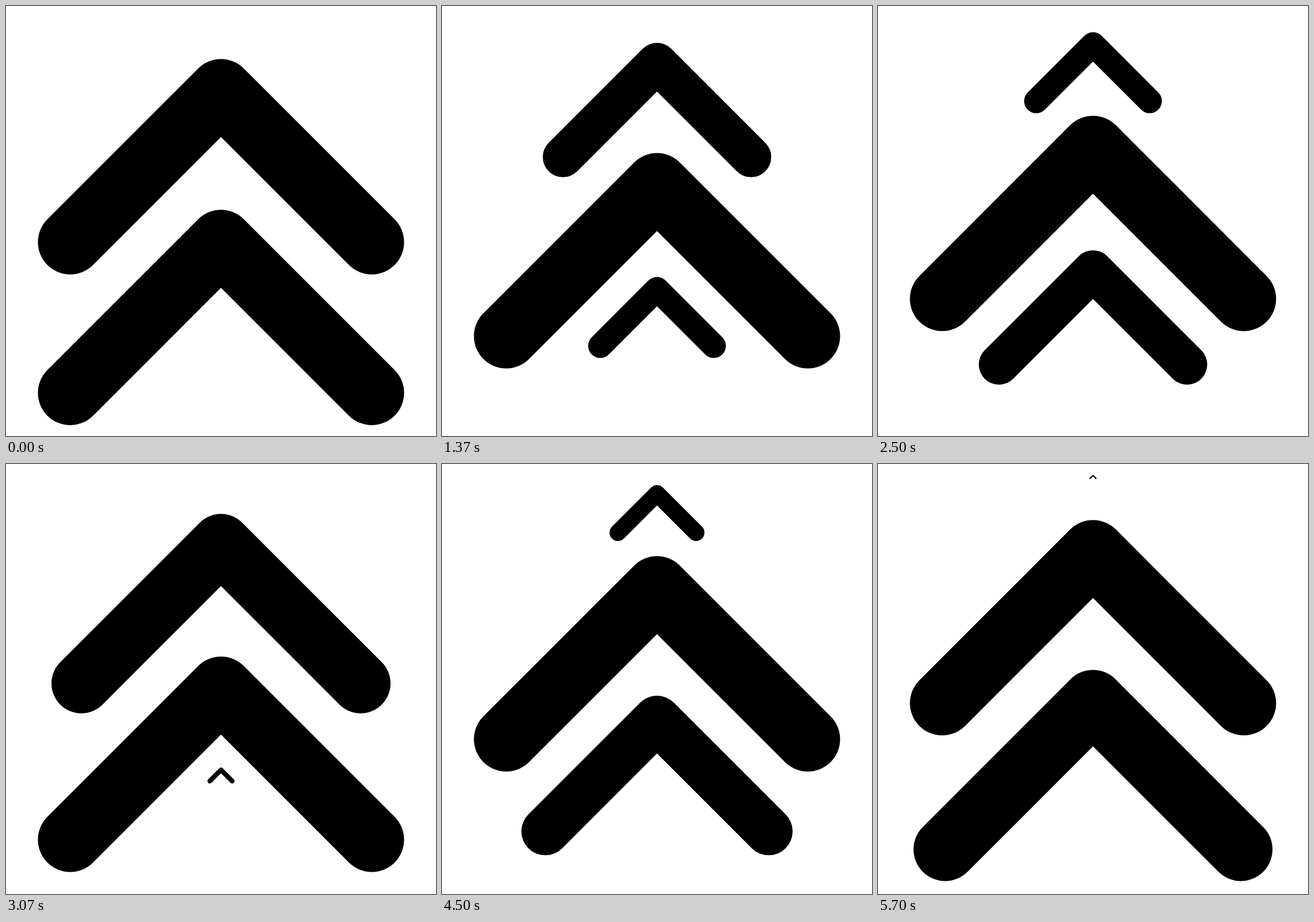
These frames come from a looping animation (748x748 px, 5730 ms). An HTML page:

```html
<!DOCTYPE html>
<html lang="en">
<head>
<meta charset="utf-8">
<title>Rising chevrons</title>
<style>
  html, body { margin: 0; width: 100%; height: 100%; overflow: hidden; background: #fff; }
  svg { display: block; width: 100%; height: 100%; }
  polyline { fill: none; stroke: #000; stroke-width: 112.4; stroke-linecap: round; stroke-linejoin: round; }
</style>
</head>
<body>
<svg viewBox="0 0 748 748">
  <polyline points="-262.3,131.15 0,-131.15 262.3,131.15"/>
  <polyline points="-262.3,131.15 0,-131.15 262.3,131.15"/>
  <polyline points="-262.3,131.15 0,-131.15 262.3,131.15"/>
</svg>
<script>
  const LOOP = 5730;
  const STEPS = 12;
  const GAP = 262.2;
  const TOP = 279.6;
  const BOTTOM = TOP + GAP;
  const chevrons = document.querySelectorAll('polyline');

  // 80 ms steps, each shown on the next 30 Hz tick (ticks rounded to 10 ms)
  function stepAt(ms) {
    const tick = Math.floor((3 * Math.floor(ms / 10) + 1) / 10);
    return Math.floor(tick * 5 / 12);
  }

  const smooth = p => p * p * (3 - 2 * p);

  function place(el, y, scale) {
    el.setAttribute('transform', `translate(374 ${y}) scale(${scale})`);
    el.style.display = scale ? '' : 'none';
  }

  function draw(now) {
    const u = smooth(stepAt(now % LOOP) % STEPS / STEPS);
    const rise = GAP * u;
    place(chevrons[0], TOP - rise, 1 - u);
    place(chevrons[1], BOTTOM - rise, 1);
    place(chevrons[2], BOTTOM, u);
  }

  function loop() {
    draw(performance.now());
    requestAnimationFrame(loop);
  }
  loop();
</script>
</body>
</html>
```
